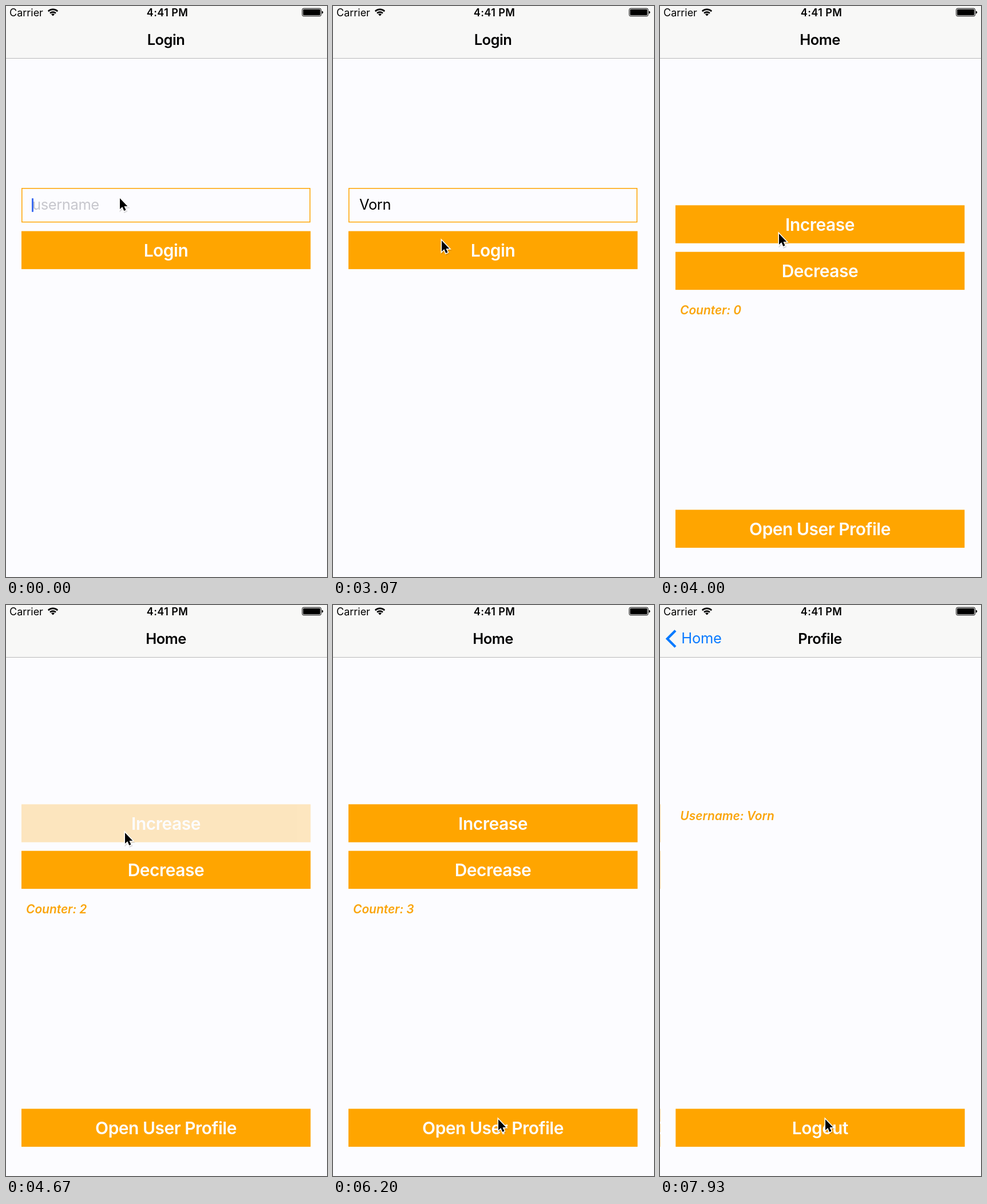
An HTML page that plays this animation: 561x998 px, repeating every 8000 ms.

```html
<!DOCTYPE html>
<html lang="en">
<head>
<meta charset="utf-8">
<title>Login demo</title>
<style>
  html, body { margin: 0; width: 100%; height: 100%; overflow: hidden; background: #fcfcff; }
  svg { display: block; width: 100vw; height: 100vh; }
  text {
    font: 400 25.5px Inter, "Open Sans", sans-serif;
    font-optical-sizing: none;
    letter-spacing: -.4px;
    white-space: pre;
  }
  .title { font-weight: 600; letter-spacing: -.5px; text-anchor: middle; }
  .button rect { fill: #ffa500; }
  .button text { font-size: 29.9px; font-weight: 600; letter-spacing: -.45px; text-anchor: middle; fill: #fdfdff; }
  .note { font-size: 20.9px; font-weight: 600; font-style: italic; letter-spacing: 0; fill: #faa50c; }
  .status { font-size: 18px; letter-spacing: 0; }
  .clock { font-weight: 600; letter-spacing: .4px; text-anchor: middle; }
  .loading { font-size: 37.4px; letter-spacing: -.6px; text-anchor: middle; fill: #faa50c; }
</style>
</head>
<body>
<svg viewBox="0 0 561 998" preserveAspectRatio="none">
  <rect width="561" height="998" fill="#fcfcff"/>

  <g id="login">
    <rect x="27.8" y="318.8" width="503.5" height="58.8" fill="none" stroke="#ffa500" stroke-width="1.5"/>
    <text id="field" x="46" y="356"></text>
    <rect id="caret" y="336" width="3" height="24" rx="1" fill="#3d6cf0"/>
    <g class="button" id="loginButton" data-top="393.5" data-label="Login"></g>
  </g>

  <g id="home">
    <g class="button" id="increase" data-top="348.3" data-label="Increase"></g>
    <g class="button" data-top="429.7" data-label="Decrease"></g>
    <text class="note" id="counter" x="35" y="539"></text>
    <g class="button" id="openProfile" data-top="880.5" data-label="Open User Profile"></g>
  </g>

  <g id="profile">
    <rect y="92" width="561" height="906" fill="#fcfcff"/>
    <text class="note" x="35" y="376">Username: Vorn</text>
    <g class="button" data-top="880.5" data-label="Logout"></g>
  </g>

  <rect width="561" height="91" fill="#f8f8f7"/>
  <rect y="91" width="561" height="1" fill="#bababa"/>
  <text class="title" id="loginTitle" x="279.5" y="68">Login</text>
  <text class="title" id="homeTitle" x="279.5" y="68">Home</text>
  <text class="title" id="profileTitle" x="279.5" y="68">Profile</text>
  <g id="back" fill="#0a7aff">
    <path d="M27 44.8L12.8 59L27 73.2" fill="none" stroke="#0a7aff" stroke-width="4.3"/>
    <text id="backLabel" x="37" y="67" style="letter-spacing:-.2px">Home</text>
  </g>

  <g id="overlay">
    <rect id="dim" width="561" height="998" fill="#8d8d8d"/>
    <text class="loading" x="279.5" y="512">Loading...</text>
  </g>

  <text class="status" x="6" y="17.5">Carrier</text>
  <g fill="none" stroke="#000" stroke-width="2.6">
    <path d="M73.8 9.2A11.8 11.8 0 0 1 90.2 9.2M77 12.6A7.2 7.2 0 0 1 87 12.6"/>
    <path d="M79 14.6A4.4 4.4 0 0 1 85 14.6L82 17.6Z" fill="#000" stroke="none"/>
  </g>
  <text class="status clock" x="282" y="17.5">4:41 PM</text>
  <rect x="517.7" y="4.2" width="33" height="13.6" rx="2.5" fill="none" stroke="#000"/>
  <rect x="519.2" y="5.7" width="30" height="10.6" rx="1.3"/>
  <path d="M552 8.5q2.4.5 2.4 2.5t-2.4 2.5z"/>

  <g id="pointer">
    <path d="M0 0V19L4.3 15L7.3 22L10.5 20.6L7.5 14H13.3Z" transform="translate(1 2)" fill="#000" stroke="#000" stroke-width="3" opacity=".13"/>
    <path d="M0 0V19L4.3 15L7.3 22L10.5 20.6L7.5 14H13.3Z" stroke="#fff" stroke-width="3" paint-order="stroke"/>
  </g>
</svg>

<script>
const LOOP = 8000, STAGE_WIDTH = 561, NAME = "Vorn";
const KEYS = [950, 1150, 1350, 1600];
const SUBMIT = 3300, HOME_SHOWN = 3470, PUSH = 7395;
const INCREASES = [4250, 4650, 5050];
const POINTER_PATH = [
  [0, 199, 336], [2000, 199, 336], [2550, 190, 410], [3500, 190, 410],
  [4000, 208, 398], [5300, 208, 398], [6050, 289, 899], [LOOP, 289, 899]
];

const $ = id => document.getElementById(id);
const clamp = v => Math.min(1, Math.max(0, v));
const smooth = v => { v = clamp(v); return v * v * (3 - 2 * v); };
const mix = (a, b, p) => a + (b - a) * p;
const show = (id, visible) => $(id).style.display = visible ? "" : "none";
const fade = (id, opacity) => $(id).style.opacity = opacity;
const move = (id, x, y = 0) => $(id).setAttribute("transform", `translate(${x} ${y})`);
const countPassed = (times, t) => times.filter(time => t >= time).length;

for (const button of document.querySelectorAll(".button")) {
  const top = +button.dataset.top;
  button.innerHTML = `<rect x="27" y="${top}" width="505.3" height="66.4"/>
    <text x="279.5" y="${top + 44.6}">${button.dataset.label}</text>`;
}

// Opacity of a touched button around the moment of release.
const touch = (t, release) =>
  1 - .75 * (smooth((t - release + 110) / 130) - smooth((t - release - 60) / 200));

function drawLogin(t) {
  const typed = t < SUBMIT ? NAME.slice(0, countPassed(KEYS, t)) : "";
  const field = $("field");
  field.textContent = typed || "username";
  field.setAttribute("fill", typed ? "#000" : "#c7c7cd");
  $("caret").setAttribute("x", typed ? 46 + field.getComputedTextLength() : 45);
  const lastKey = KEYS.filter(time => t >= time).pop() || 0;
  show("caret", t >= SUBMIT || (t - lastKey) % 900 < 500);
  fade("loginButton", touch(t, SUBMIT));
  fade("dim", .17 * clamp((t - SUBMIT) / 100));
}

function drawHome(t) {
  $("counter").textContent = "Counter: " + countPassed(INCREASES, t);
  fade("increase", Math.min(...INCREASES.map(release => touch(t, release))));
  fade("openProfile", touch(t, 7390));
}

function drawPush(t) {
  const x = Math.max(0, t - PUSH) / 55;
  const p = 1 - (1 + x) * Math.exp(-x);
  move("home", -.3 * STAGE_WIDTH * p);
  move("profile", STAGE_WIDTH * (1 - p));
  move("homeTitle", -207 * p);
  move("backLabel", 207 * (1 - p));
  move("profileTitle", 200 * (1 - p));
  fade("homeTitle", 1 - p);
  fade("profileTitle", p);
  fade("back", p);
}

function drawPointer(t) {
  const next = POINTER_PATH.findIndex(([time]) => time > t);
  const [t0, x0, y0] = POINTER_PATH[next - 1], [t1, x1, y1] = POINTER_PATH[next];
  const p = smooth((t - t0) / (t1 - t0));
  move("pointer", mix(x0, x1, p), mix(y0, y1, p));
}

function draw(now) {
  const t = now % LOOP, atHome = t >= HOME_SHOWN, pushed = t >= PUSH;
  for (const id of ["login", "loginTitle"]) show(id, !atHome);
  for (const id of ["home", "homeTitle"]) show(id, atHome);
  for (const id of ["profile", "profileTitle", "back"]) show(id, pushed);
  show("overlay", t >= SUBMIT && !atHome);
  if (atHome) drawHome(t); else drawLogin(t);
  drawPush(t);
  drawPointer(t);
}

const start = performance.now();
function tick() {
  draw(performance.now() - start);
  requestAnimationFrame(tick);
}
tick();
</script>
</body>
</html>
```
